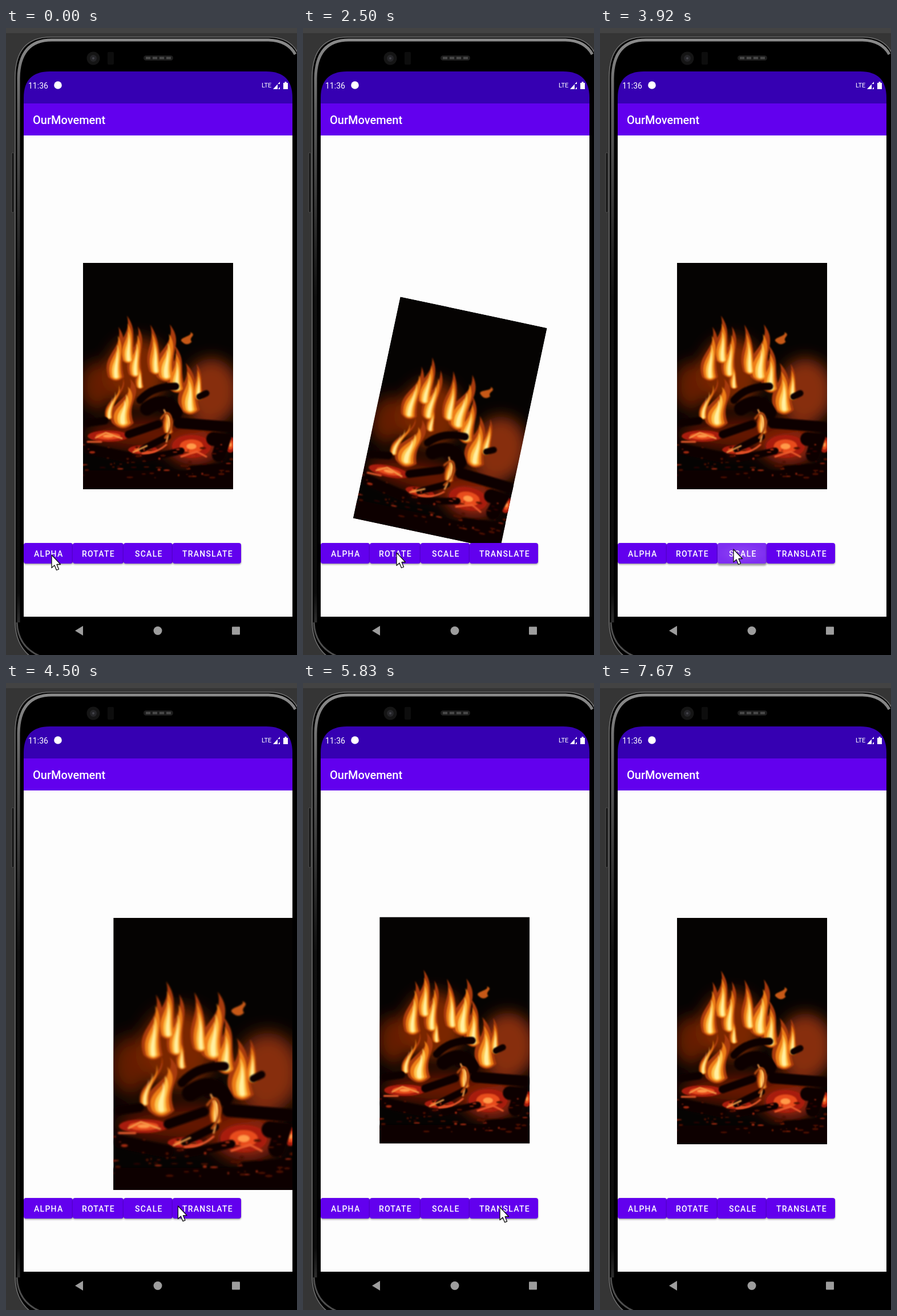
Recreate the animation shown at these times as an HTML page. Size 510 by 1097 pixels, loop 7.76 s.

```html
<!DOCTYPE html>
<html lang="en">
<head>
<meta charset="utf-8">
<title>View animations</title>
<style>
html, body { margin: 0; width: 100%; height: 100%; overflow: hidden; background: #353535; }
svg { display: block; width: 100vw; height: 100vh; }
text { font-family: Roboto, "Open Sans", sans-serif; fill: #fff; }
.label { font-size: 14px; font-weight: 500; letter-spacing: 1.25px; }
</style>
</head>
<body>
<svg viewBox="0 0 510 1097" preserveAspectRatio="none">
  <defs>
    <linearGradient id="rim" gradientUnits="userSpaceOnUse" x1="0" y1="16" x2="0" y2="1097">
      <stop offset="0" stop-color="#8c8c8c"/>
      <stop offset=".12" stop-color="#5e5e5e"/>
      <stop offset=".42" stop-color="#101010"/>
      <stop offset=".9" stop-color="#0c0c0c"/>
      <stop offset="1" stop-color="#555"/>
    </linearGradient>
    <radialGradient id="press">
      <stop offset="0" stop-color="#fff" stop-opacity=".28"/>
      <stop offset="1" stop-color="#fff" stop-opacity=".18"/>
    </radialGradient>
    <filter id="soft" x="-40%" y="-40%" width="180%" height="180%"><feGaussianBlur stdDeviation="1.3"/></filter>
    <filter id="haze" x="-60%" y="-60%" width="220%" height="220%"><feGaussianBlur stdDeviation="13"/></filter>
    <filter id="drop" x="-10%" y="-30%" width="120%" height="180%"><feGaussianBlur stdDeviation="1.4"/></filter>
    <clipPath id="content"><rect x="31" y="188" width="471" height="842"/></clipPath>
    <clipPath id="frame"><rect width="263" height="396"/></clipPath>
  </defs>

  <rect width="510" height="1097" fill="#353535"/>
  <rect width="510" height="9" fill="#434343"/>
  <rect x="10" y="218" width="4" height="105" rx="2" fill="#161616" stroke="#5a5a5a" stroke-width=".8"/>

  <path d="M16 85Q17 16 78 16H462Q502 17 514 50V1110H60Q17 1090 16 1040Z" fill="#000" stroke="#6d6d6d" stroke-width="1.6"/>
  <path d="M22 1040V88Q23 21 80 21H460Q494 22 507 46" fill="none" stroke="url(#rim)" stroke-width="5"/>
  <path d="M19 1040Q21 1084 62 1100" fill="none" stroke="#4e4e4e" stroke-width="3"/>
  <circle cx="153" cy="53" r="11.5" fill="#151515"/>
  <circle cx="153" cy="53" r="6" fill="#252528"/>
  <circle cx="153" cy="53" r="2" fill="#44444a"/>
  <rect x="178" y="42" width="11" height="22" rx="2" fill="#0d0d0d"/>
  <rect x="241" y="48" width="52" height="9" rx="4.5" fill="#1d1d1d"/>
  <path d="M245 52.5H291" stroke="#4a4a4a" stroke-width="4" stroke-dasharray="8 4"/>

  <path d="M31 132V122Q31 76 77 76H456Q502 76 502 122V132Z" fill="#3600b2"/>
  <rect x="31" y="132" width="471" height="56" fill="#6200ee"/>
  <rect x="31" y="188" width="471" height="842" fill="#fdfdfd"/>
  <text x="39" y="106" font-size="14">11:36</text>
  <circle cx="91" cy="100" r="6.8" fill="#fff"/>
  <text x="448" y="104" font-size="11">LTE</text>
  <path d="M468 107L480 94V98H476V107ZM477 107L480 103V107Z" fill="#fff"/>
  <path d="M486 96H488.500V94H491.500V96H494V107H486Z" fill="#fff"/>
  <text x="47" y="168" font-size="20" font-weight="500">OurMovement</text>

  <g clip-path="url(#content)"><g id="mover"><g id="photo" transform="translate(135 411)" clip-path="url(#frame)"></g></g></g>
  <g id="buttons"></g>

  <g fill="#9d9d9d">
    <path d="M121 1054.500L135 1046V1063Z"/>
    <circle cx="266" cy="1054.500" r="7.500"/>
    <rect x="396" y="1047.500" width="14" height="14" rx="1"/>
  </g>
  <path id="cursor" d="M0 0V22.500L5 18L8.500 26.500L12.500 25L9 16.500H15.500Z" fill="#fff" stroke="#111" stroke-width="1.3" stroke-linejoin="round"/>
</svg>
<script>
const NS = 'http://www.w3.org/2000/svg';
const byId = id => document.getElementById(id);
const add = (parent, tag, attrs = {}, text = '') => {
  const el = document.createElementNS(NS, tag);
  for (const key in attrs) el.setAttribute(key, attrs[key]);
  el.textContent = text;
  parent.append(el);
  return el;
};

// Fireplace picture, 263 x 396
const photo = byId('photo');
const layer = filter => add(photo, 'g', { filter: `url(#${filter})` });
add(photo, 'rect', { width: 263, height: 396, fill: '#050302' });

const glow = layer('haze');
for (const [cx, cy, rx, ry, fill] of [
  [25, 215, 30, 42, '#641d05'], [225, 225, 48, 58, '#872d08'],
  [95, 190, 55, 60, '#7a2704'], [125, 300, 120, 28, '#631304'],
  [195, 325, 45, 28, '#9b2508']
]) add(glow, 'ellipse', { cx, cy, rx, ry, fill });

const flamePath = (x, y, w, h, lean) =>
  `M${x - w / 2} ${y}C${x - w} ${y - h * .45} ${x + lean + w * .35} ${y - h * .55} ${x + lean} ${y - h}` +
  `C${x + lean + w * .75} ${y - h * .65} ${x + w * .1} ${y - h * .5} ${x + w / 2} ${y}Q${x} ${y + w * .5} ${x - w / 2} ${y}Z`;

const flames = [
  [58, 205, 28, 88, 4], [80, 175, 26, 78, -3], [92, 200, 24, 84, 4],
  [70, 285, 38, 78, 12], [46, 275, 14, 70, 24], [128, 195, 24, 82, -10],
  [146, 205, 34, 92, 6], [165, 225, 28, 76, -4], [188, 262, 34, 82, -8],
  [203, 240, 18, 60, -4], [100, 220, 14, 44, -4], [150, 300, 16, 62, -4]
];
const tones = [['#a83a08', 1], ['#ee7d18', .7], ['#ffc64d', .42], ['#fff0a0', .2]];
const fire = layer('soft');
for (const [fill, k] of tones)
  for (const [x, y, w, h, lean] of flames)
    add(fire, 'path', { d: flamePath(x, y - h * .06, w * k, h * (.4 + .6 * k), lean * k), fill });
add(fire, 'path', { d: flamePath(182, 138, 17, 17, 6), fill: '#c65812' });

const stroke = (parent, d, color, width) =>
  add(parent, 'path', { d, fill: 'none', stroke: color, 'stroke-width': width, 'stroke-linecap': 'round' });

const coals = layer('soft');
for (const [fill, k] of [['#a81e08', 1], ['#e84c1c', .6], ['#ff9a4a', .25]]) {
  add(coals, 'ellipse', { cx: 190, cy: 321, rx: 34 * k, ry: 20 * k, fill });
  add(coals, 'ellipse', { cx: 44, cy: 303, rx: 36 * k, ry: 10 * k, fill });
  add(coals, 'ellipse', { cx: 105, cy: 327, rx: 26 * k, ry: 8 * k, fill });
  add(coals, 'ellipse', { cx: 258, cy: 318, rx: 9 * k, ry: 14 * k, fill });
}

const logs = layer('soft');
for (const [d, width] of [
  ['M100 240Q122 215 162 216', 13], ['M112 255Q145 232 162 262', 24],
  ['M8 280L38 276', 13], ['M80 300L132 282', 14], ['M104 326L148 304', 12],
  ['M168 280L256 287', 19], ['M204 234L216 228', 11], ['M228 308L246 310L238 336', 24],
  ['M112 342L172 329', 12], ['M10 326L78 340', 19], ['M5 383H258', 40], ['M190 362L260 356', 14]
]) stroke(logs, d, '#0c0403', width);

const embers = layer('soft');
stroke(embers, 'M22 306L40 297L68 307M88 331L112 320M146 313Q156 285 142 257', '#f7a24c', 2.5);
stroke(embers, 'M104 333Q128 334 146 318M172 339L199 330L216 339M8 313H32', '#ec5d2d', 3);
stroke(embers, 'M137 272Q152 251 156 279Q154 294 144 306', '#a9440e', 4);
let seed = 7;
const rand = () => (seed = seed * 16807 % 2147483647) / 2147483647;
for (let i = 0; i < 70; i++)
  add(embers, 'ellipse', {
    cx: rand() * 263, cy: 318 + rand() * 58, rx: 1 + rand() * 5, ry: .6 + rand() * 1.6,
    fill: rand() < .25 ? '#a52a10' : '#4c0d05'
  });

// Buttons: left edge, width, text start, label, press time
const buttons = [
  [31, 86, 49, 'ALPHA', 665], [117, 89, 133, 'ROTATE', 2245],
  [206, 86, 226, 'SCALE', 3830], [292, 120, 309, 'TRANSLATE', 5580]
].map(([x, width, tx, label, at]) => {
  const box = { x, y: 901, width, height: 36, rx: 4 };
  const g = byId('buttons');
  const shadow = add(g, 'rect', { ...box, y: 902.5, fill: '#000', opacity: .4, filter: 'url(#drop)' });
  add(g, 'rect', { ...box, fill: '#6200ee' });
  const ripple = add(g, 'rect', { ...box, fill: 'url(#press)' });
  add(g, 'text', { x: tx, y: 925, class: 'label' }, label);
  return { at, shadow, ripple };
});

const LOOP = 7760, STEP = 250 / 3, LENGTH = 2000;
const clamp = v => Math.max(0, Math.min(1, v));
const ease = v => .5 - .5 * Math.cos(Math.PI * clamp(v));

// A new effect replaces the one still running
const effects = [
  [748, p => ['', p]],
  [2335, p => [`rotate(${720 * p} -128 609)`, 1]],
  [3906, p => [`translate(-128 411) scale(${1 + p}) translate(128 -411)`, 1]],
  [5662, p => [`translate(${-43.6 * p} ${-87.2 * p})`, 1]]
];

// Pointer: time, x, y
const track = [
  [0, 80, 922], [1080, 80, 922], [1500, 130, 912], [1830, 164, 918], [3080, 164, 918],
  [3670, 234, 912], [4170, 234, 912], [4750, 345, 917], [5830, 345, 917], [6170, 525, 1010]
];
const pointerAt = t => {
  const i = track.findIndex(k => k[0] > t);
  if (i < 0) return track[track.length - 1].slice(1);
  const [a, b] = [track[i - 1], track[i]];
  const p = ease((t - a[0]) / (b[0] - a[0]));
  return [a[1] + (b[1] - a[1]) * p, a[2] + (b[2] - a[2]) * p];
};

const draw = now => {
  const t = Math.min(92, Math.floor((now % LOOP + 5) / STEP)) * STEP;

  let pose = ['', 1];
  const active = effects.filter(e => e[0] <= t).pop();
  if (active && t < active[0] + LENGTH) pose = active[1](ease((t - active[0]) / LENGTH));
  byId('mover').setAttribute('transform', pose[0]);
  byId('mover').setAttribute('opacity', pose[1]);

  for (const { at, shadow, ripple } of buttons) {
    const u = t - at;
    const glowing = u < 0 ? 0 : Math.min(clamp(.5 + u / 120), clamp((245 - u) / 120));
    ripple.setAttribute('opacity', glowing);
    shadow.setAttribute('y', 902.5 + 2 * glowing);
  }

  const [x, y] = pointerAt(t);
  byId('cursor').setAttribute('transform', `translate(${x} ${y})`);
};

const start = performance.now();
const tick = () => {
  draw(performance.now() - start);
  requestAnimationFrame(tick);
};
tick();
</script>
</body>
</html>
```
